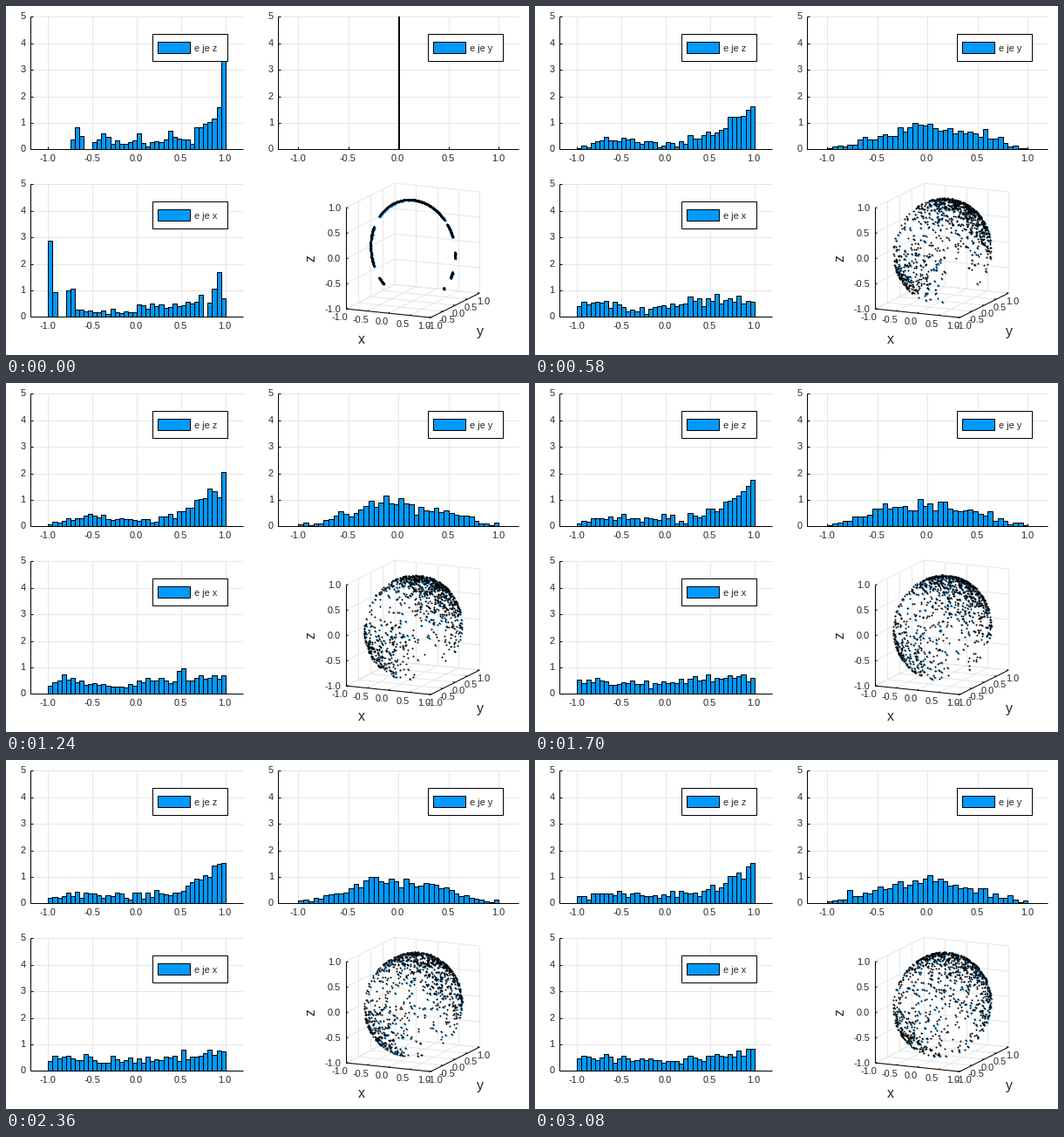
Recreate the animation shown at these times as a matplotlib script. Size 600 by 400 pixels, loop 3.1 s.

```python
import numpy as np
import matplotlib.pyplot as plt
from matplotlib.animation import FuncAnimation
from matplotlib.collections import LineCollection, PolyCollection

W, H, DPI = 600, 400, 100
PX = 72 / DPI
BLUE, INK, GRID = "#0099ff", "#262626", "#e6e6e6"
TICKS = np.linspace(-1, 1, 5)
EDGES = np.linspace(-1, 1, 41)

# Playback rhythm in 20 ms ticks: two short steps, one long
STEPS = 67
STEP_AT = np.repeat(np.arange(STEPS), [5 if k % 3 == 1 else 1 for k in range(STEPS)])

plt.rcParams["font.family"] = "Liberation Sans"
fig = plt.figure(figsize=(W / DPI, H / DPI), dpi=DPI, facecolor="white")
ax = fig.add_axes([0, 0, 1, 1])
# Offset so that whole numbers snap to their own pixel
ax.set(xlim=(-0.4, W - 0.4), ylim=(H - 0.4, -0.4))
ax.axis("off")


def simulate(seed=12):
    """Points leave arcs of a ring, drift into two wells and spread sideways."""
    rng = np.random.default_rng(seed)
    # from, to (degrees), number of points
    arcs = ((217, 226, 75), (157, 203, 190), (90, 143, 175), (42, 90, 350),
            (20, 36, 105), (-4, 3, 35), (-28, -20, 60), (-44, -42, 10))
    phi = np.radians(np.concatenate([rng.uniform(a, b, n) for a, b, n in arcs]))
    low = phi > np.radians(150)
    home = np.radians(np.where(low, 218, 60))
    spread = np.where(low, 0.33, 0.55)
    lat = np.zeros_like(phi)

    def pull(value, centre, std, keep):
        kick = std * np.sqrt(1 - keep ** 2)
        return centre + keep * (value - centre) + kick * rng.normal(size=len(value))

    states = []
    for k in range(STEPS):
        states.append((np.cos(lat) * np.cos(phi), np.sin(lat),
                       np.cos(lat) * np.sin(phi)))
        phi = pull(phi, home, spread * (1 + 0.5 * k / STEPS), 0.88)
        lat = pull(lat, 0, 0.47, 0.92)
    return states


def lines(segs, color):
    ax.add_collection(LineCollection(segs, colors=color, linewidths=PX))


def label(x, y, s, size=11, **kw):
    kw = {"ha": "center", "va": "center", "color": INK, **kw}
    ax.text(x, y, s, fontsize=size * PX, **kw)


def rect(x, y, w, h, fill):
    ax.add_patch(plt.Rectangle((x, y), w, h, fc=fill, ec="black", lw=PX, zorder=4))


class Histogram:
    HEIGHT = 152

    def __init__(self, left, right, base, name, box):
        self.base, self.cx = base, (left + right) / 2
        self.unit = (right - left) / 2.4
        top = base - self.HEIGHT
        xs = self.cx + self.unit * TICKS
        ys = np.linspace(base, top, 6)
        lines([[(x, top), (x, base)] for x in xs]
              + [[(left, y), (right, y)] for y in ys], GRID)
        self.bars = PolyCollection([], facecolors=BLUE, edgecolors="black",
                                   linewidths=PX, zorder=2)
        ax.add_collection(self.bars)
        lines([[(left, top), (left, base)], [(left, base), (right, base)]]
              + [[(x, base), (x, base - 3)] for x in xs]
              + [[(left, y), (left + 3, y)] for y in ys], "black")
        for t, x in zip(TICKS, xs):
            label(x - 0.7, base + 10.5, f"{t:.1f}")
        for v, y in enumerate(ys):
            label(left - 5.5, y, str(v), ha="right")
        rect(box, top + 20, 86, 30.5, "white")
        rect(box + 6, top + 29, 36.5, 13, BLUE)
        label(box + 47.5, top + 40, f"e je {name}", ha="left",
              va="baseline", zorder=5)

    def show(self, values):
        if np.ptp(values) == 0:
            edges, heights = np.array([-0.004, 0.004]), np.array([5])
        else:
            edges = EDGES
            heights, _ = np.histogram(values, EDGES, density=True)
        x = self.cx + self.unit * edges
        b = self.base
        tops = b - self.HEIGHT * np.minimum(heights / 5, 1)
        self.bars.set_verts([[(l, b), (l, t), (r, t), (r, b)]
                             for l, r, t in zip(x, x[1:], tops) if t < b])


def project(x, y, z):
    return 466.3 + 48.5 * x + 28 * y, 279.7 + 5 * x - 14 * y - 58 * z


def seg(a, b):
    return [project(*a), project(*b)]


def draw_box():
    grid = []
    for t in TICKS:
        grid += [seg((t, -1, -1), (t, 1, -1)), seg((-1, t, -1), (1, t, -1)),
                 seg((-1, t, -1), (-1, t, 1)), seg((-1, -1, t), (-1, 1, t)),
                 seg((t, 1, -1), (t, 1, 1)), seg((-1, 1, t), (1, 1, t))]
    lines(grid, GRID)
    axes = [seg((-1, -1, -1), (1, -1, -1)), seg((1, -1, -1), (1, 1, -1)),
            seg((-1, -1, -1), (-1, -1, 1))]
    for t in TICKS:
        axes += [seg((t, -1, -1), (t, -0.94, -1)), seg((1, t, -1), (0.95, t, -1)),
                 seg((-1, -1, t), (-0.95, -1, t))]
        for point, dx, dy, side in (((t, -1, -1), -7.5, 10, "center"),
                                    ((1, t, -1), 4.5, 10, "center"),
                                    ((-1, -1, t), -6, 1, "right")):
            x, y = project(*point)
            label(x + dx, y + dy, f"{t:.1f}", ha=side)
    lines(axes, "black")
    label(407.5, 382, "x", 16)
    label(543.5, 373.5, "y", 16)
    label(349, 289, "z", 16, rotation=90)


states = simulate()
z_panel = Histogram(27.6, 271.6, 164, "z", 168)
y_panel = Histogram(312, 588, 164, "y", 484)
x_panel = Histogram(27.6, 271.6, 356, "x", 168)
draw_box()
cores, = ax.plot([], [], "o", ms=2 * PX, mfc=BLUE, mew=0, zorder=2.5)
dots, = ax.plot([], [], "o", ms=2 * PX, mfc="black", mew=0, zorder=3)


def update(n):
    x, y, z = states[STEP_AT[n]]
    x_panel.show(x)
    y_panel.show(y)
    z_panel.show(z)
    u, v = project(x, y, z)
    dots.set_data(u, v)
    cores.set_data(u[::3] + 1, v[::3] + 0.8)
    return dots, cores


anim = FuncAnimation(fig, update, frames=len(STEP_AT), interval=20,
                     repeat=True, repeat_delay=0, blit=False)
plt.show()
```
